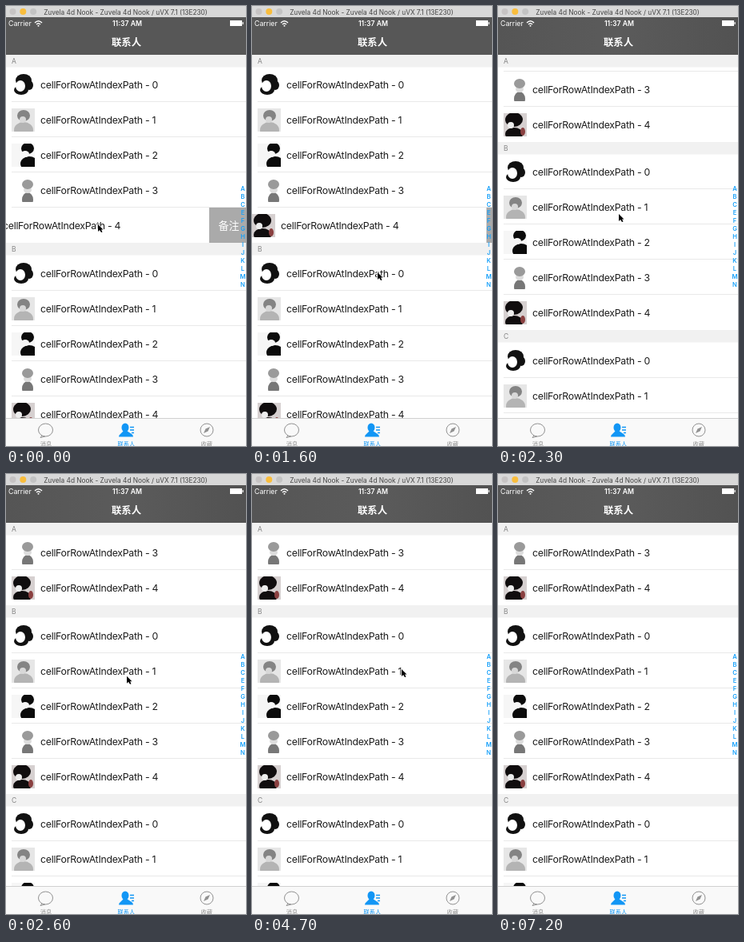
These frames come from a looping animation (300 px wide and 550 px high, 7.3 s). An HTML page with a canvas:

```html
<!DOCTYPE html>
<html lang="zh">
<head>
<meta charset="utf-8">
<title>Contacts list</title>
<style>
  html, body { margin: 0; width: 100%; height: 100%; overflow: hidden; background: #fff; }
  canvas { display: block; }
</style>
</head>
<body>
<canvas id="stage" width="300" height="550"></canvas>
<script>
const ctx = document.getElementById('stage').getContext('2d');
const LOOP = 7300, STEP = 100;
const TOP = 61, HEADER = 15.5, ROW = 44, SECTION = HEADER + 5 * ROW;
const AVATAR = 29, OPEN = 47, SCROLL = 132;
const BLUE = '#1296f5', GRAY = '#929292';
const LATIN = 'Inter, "Noto Sans CJK SC", "Noto Sans CJK", sans-serif';
const CJK = '"Noto Sans CJK SC", "Noto Sans CJK", sans-serif';

const progress = (t, from, to) => Math.min(1, Math.max(0, (t - from) / (to - from)));
const ramp = (t, from, to) => {
  const p = progress(t, from, to);
  return p * p * (3 - 2 * p);
};

// Pose of everything that moves
function poseAt(t) {
  const scroll = SCROLL * (1 - (1 - progress(t, 1900, 2520)) ** 3);
  const firstDrag = ramp(t, 2900, 3300), secondDrag = ramp(t, 5200, 5670);
  const toNextRow = ramp(t, 300, 1300), back = ramp(t, 3700, 4300), exit = ramp(t, 6300, 6900);
  return {
    scroll,
    shifts: {
      A4: -OPEN * (1 - ramp(t, 1350, 1680)),
      B1: -OPEN * (firstDrag - ramp(t, 3900, 4200) + secondDrag - ramp(t, 6000, 6300))
    },
    cursor: [
      115 + 42 * toNextRow - 6 * ramp(t, 1600, 2300) - 103 * firstDrag + 139 * back - 64 * secondDrag + 190 * exit,
      273 + 60 * toNextRow + 53 * ramp(t, 1600, 1900) - scroll - 13 * ramp(t, 2500, 3000) + 3 * back - 10 * secondDrag + 60 * exit
    ]
  };
}

function rect(color, x, y, w, h) {
  ctx.fillStyle = color;
  ctx.fillRect(x, y, w, h);
}

function blob(color, x, y, rx, ry = rx, outline = false) {
  ctx.beginPath();
  ctx.ellipse(x, y, rx, ry, 0, 0, Math.PI * 2);
  ctx.fillStyle = ctx.strokeStyle = color;
  ctx.lineWidth = 1;
  outline ? ctx.stroke() : ctx.fill();
}

function text(str, x, y, size, color, { align = 'left', weight = 400, family = LATIN, spacing = 0 } = {}) {
  ctx.font = `${weight} ${size}px ${family}`;
  ctx.letterSpacing = spacing + 'px';
  ctx.textAlign = align;
  ctx.fillStyle = color;
  ctx.fillText(str, x, y);
}

function stroke(d, color, width = 1) {
  ctx.strokeStyle = color;
  ctx.lineWidth = width;
  ctx.stroke(new Path2D(d));
}

function gradient(x, y, ...colors) {
  const g = ctx.createLinearGradient(0, 0, x, y);
  colors.forEach((c, i) => g.addColorStop(i / (colors.length - 1), c));
  return g;
}

// Soft silhouettes: hair, face, body
const portraits = [
  () => {
    blob('#111', 15, 9, 10, 8);
    blob('#111', 22, 15, 5, 6);
    blob('#111', 12, 21, 9, 6);
    blob('#fff', 11, 16, 6, 7);
  },
  () => {
    rect('#e6e6e6', 0, 0, AVATAR, AVATAR);
    blob('#b4b4b4', 15, 27, 12, 10);
    blob('#848484', 15, 9, 8, 7);
    blob('#d8d8d8', 14, 14, 4);
  },
  () => {
    rect('#f6f6f6', 0, 0, AVATAR, AVATAR);
    blob('#0b0b0b', 20, 6, 8, 7);
    blob('#0b0b0b', 22, 25, 11, 9);
    blob('#f6f6f6', 17, 13, 5, 4);
  },
  () => {
    blob('#777', 20, 26, 7, 9);
    blob('#ddd', 20, 14, 5, 4);
    blob('#9a9a9a', 20, 7, 7, 6);
  },
  () => {
    rect('#d6d0d0', 0, 0, AVATAR, AVATAR);
    blob('#100d0e', 13, 8, 11, 9);
    blob('#100d0e', 13, 26, 11, 8);
    blob('#eee', 9, 15, 4);
    blob('#8a4040', 24, 23, 3, 5);
  }
];

function drawAvatar(index, x, y) {
  ctx.save();
  ctx.translate(x, y);
  ctx.beginPath();
  ctx.rect(0, 0, AVATAR, AVATAR);
  ctx.clip();
  portraits[index]();
  ctx.restore();
}

function drawRow(index, y, shift) {
  if (shift < 0) {
    rect('#aaa', 254, y, 46, ROW);
    text('备注', 278.5, y + 26.5, 13, '#fff', { align: 'center', family: CJK });
  }
  rect('#fff', shift, y, 300, ROW);
  drawAvatar(index, 7 + shift, y + 8);
  text('cellForRowAtIndexPath - ' + index, 43 + shift, y + 26.5, 12.3, '#1c1c1c', { spacing: -0.26 });
  if (index < 4) rect('#e9e9e9', 7, y + ROW - 1, 293, 1);
}

function drawList({ scroll, shifts }) {
  [...'ABC'].forEach((letter, s) => {
    const top = TOP + s * SECTION - scroll;
    for (let r = 0; r < 5; r++) drawRow(r, Math.floor(top + HEADER + r * ROW), shifts[letter + r] || 0);
    const y = Math.max(TOP, Math.floor(top));
    rect('#f1f1f1', 0, y, 300, HEADER);
    text(letter, 7, y + 11, 8.5, '#858585');
  });
  [...'ABCEFGHIJKLMN'].forEach((c, i) =>
    text(c, 296, 230.7 + i * 10, 7.6, '#16a0fa', { align: 'center', weight: 600 }));
}

function drawTop(scroll) {
  rect('#d8d8d8', 0, 0, 300, 14);
  ['#c6c3c3', '#f9bd3c', '#c3c3c3'].forEach((c, i) => blob(c, 8.5 + i * 12.8, 7, 4));
  text('Zuvela 4d Nook - Zuvela 4d Nook / uVX 7.1 (13E230)', 149.5, 10.6, 8.3, '#444', { align: 'center' });

  rect(scroll ? gradient(300, 0, '#555', '#5b5b5b', '#525252') : '#575757', 0, 14, 300, TOP - 14);
  text('Carrier', 3, 25, 8.8, '#fff');
  stroke('M36 21Q40.5 16.5 45 21M38 23Q40.5 20.5 43 23', '#fff', 1.4);
  blob('#fff', 40.5, 24.7, 1);
  text('11:37 AM', 151.5, 25, 8.7, '#fff', { align: 'center', weight: 600 });
  rect('#fff', 280, 18, 15, 7);
  rect('#fff', 295.5, 20, 1.2, 3);
  text('联系人', 150.5, 49.5, 12.4, '#fff', { align: 'center', weight: 700, family: CJK });
}

function drawTabs() {
  rect('#f9f9f9', 0, 516, 300, 34);
  rect('#d0d0d0', 0, 515, 300, 1);

  blob(GRAY, 49.5, 530, 9, 8, true);
  stroke('M45 537L43 539.5L49 538', GRAY);

  blob(BLUE, 149, 527, 4.5, 5.5);
  ctx.fill(new Path2D('M147 531H151L157 535Q159 536 159 538.5H141Q141 536 143 535Z'));
  stroke('M155 526.5H160M155 530H160M157 533.5H160', BLUE, 1.3);

  blob(GRAY, 251, 530, 8, 8, true);
  ctx.fill(new Path2D('M255 526L252.5 531.5L247 534L249.5 528.5Z'));

  [['消息', GRAY], ['联系人', BLUE], ['收藏', GRAY]].forEach(([label, color], i) =>
    text(label, 50 + i * 100.4, 549.6, 7.3, color, { align: 'center', family: CJK }));
}

function drawCursor(x, y) {
  const arrow = new Path2D('M0 0V9L2 7L4 10L5.5 9.5L4 6.5H6.5Z');
  ctx.save();
  ctx.translate(x, y);
  ctx.strokeStyle = '#fff';
  ctx.lineWidth = 1.4;
  ctx.stroke(arrow);
  ctx.fillStyle = '#000';
  ctx.fill(arrow);
  ctx.restore();
}

function draw(now) {
  const pose = poseAt(Math.floor((now % LOOP) / STEP) * STEP);
  rect('#fff', 0, 0, 300, 550);
  drawList(pose);
  drawTop(pose.scroll);
  drawTabs();
  drawCursor(...pose.cursor);
  requestAnimationFrame(draw);
}
requestAnimationFrame(draw);
</script>
</body>
</html>
```
